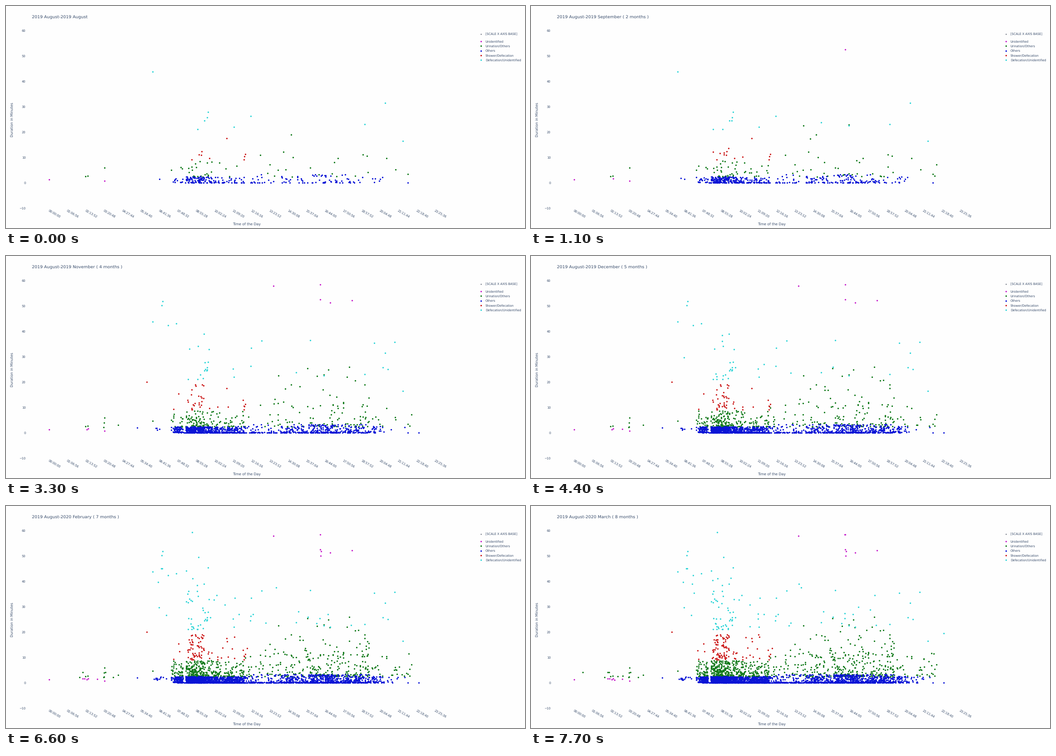
Animation of 1143x490 px, one loop 8 s. Source, as a matplotlib script:

```python
import numpy as np
import matplotlib.pyplot as plt
from matplotlib.animation import FuncAnimation

W, H, DPI = 1143, 490, 64
INK = "#384c6b"
FRAME_MS, LOOP_MS, HOLD_MS = 100, 8000, 1100
MONTHS = ["2019 August", "2019 September", "2019 October", "2019 November",
          "2019 December", "2020 January", "2020 February", "2020 March"]
AUG, SEP, OCT, NOV, DEC, JAN, FEB, MAR = range(8)
COLORS = {
    "Unidentified": "#c822cc",
    "Urination/Others": "#117a1a",
    "Others": "#0a14d6",
    "Shower/Defecation": "#cc1a1a",
    "Defecation/Unidentified": "#30d5d8",
}
PINK, GREEN, BLUE, RED, CYAN = COLORS
ZERO_Y, PER_MINUTE = 390.1, 5.6

# Share of all visits that each month adds
STEADY = [0.09, 0.08, 0.08, 0.16, 0.13, 0.13, 0.17, 0.16]
RISING = [0.06, 0.05, 0.05, 0.14, 0.13, 0.13, 0.22, 0.22]

plt.rcParams["text.hinting"] = "none"
rng = np.random.default_rng(8)
visits = {name: [np.empty((0, 2))] * len(MONTHS) for name in COLORS}


def add(name, month, x, minutes):
    y = ZERO_Y - PER_MINUTE * np.asarray(minutes)
    visits[name][month] = np.vstack([visits[name][month], np.column_stack([x, y])])


def band(name, total, low, high, skew, spans, share=RISING):
    """Random visits over (start, end, weight) spans; skew pulls them towards low."""
    start, end, weight = np.array(spans, float).T
    done = np.round(total * np.cumsum(share)).astype(int)
    for month, count in enumerate(np.diff(done, prepend=0)):
        pick = rng.choice(len(weight), count, p=weight / weight.sum())
        x = rng.uniform(start[pick], end[pick])
        add(name, month, x, low + (high - low) * rng.random(count) ** skew)


MORNING = [(363, 370, 2), (370, 390, 11), (396, 436, 45), (436, 465, 18), (465, 525, 24)]
AFTERNOON = [(525, 605, 15), (605, 668, 20), (668, 720, 32), (720, 800, 33)]

band(BLUE, 1150, 0.1, 2.45, 1.0, MORNING, STEADY)
band(BLUE, 600, 0.1, 3.3, 1.5, AFTERNOON, STEADY)
band(BLUE, 800, 0, 0.2, 2.5, [(375, 396, 3), (396, 525, 54), (525, 800, 43)], STEADY)
band(BLUE, 65, 0, 2.6, 1.6, [(800, 830, 4), (830, 882, 1)], STEADY)
band(BLUE, 14, 0.9, 2.5, 1.0, [(325, 353, 1)])

band(GREEN, 440, 2.4, 8.9, 1.9, MORNING)
band(GREEN, 270, 2.4, 11.5, 1.8, AFTERNOON)
band(GREEN, 55, 11, 23, 1.7, [(570, 650, 1), (650, 800, 4)])
band(GREEN, 34, 2.5, 12, 1.1, [(800, 894, 1)])
band(GREEN, 12, 2.1, 4.7, 1.3, [(160, 250, 2), (250, 332, 1)])

band(RED, 75, 9, 19, 1.2, [(397, 436, 1)])
band(RED, 26, 9, 20, 1.6, [(365, 382, 5), (438, 490, 14), (490, 552, 7)])

band(CYAN, 46, 21, 46, 1.8, [(396, 426, 3), (426, 450, 1)])
band(CYAN, 10, 23, 52, 0.8, [(318, 363, 1)])
band(CYAN, 36, 22, 40, 1.3, [(450, 570, 12), (570, 690, 8), (690, 760, 10), (780, 868, 4)])

band(PINK, 6, 0.9, 1.7, 1.0, [(155, 232, 1)])
band(PINK, 5, 45, 59, 1.0, [(690, 720, 1)])

# Isolated visits
for name, month, x, minutes in [
        (PINK, AUG, [95, 217], [1.3, 0.7]),
        (PINK, NOV, [589, 692, 762], [57.9, 58.4, 52.2]),
        (GREEN, AUG, [180, 217, 632, 838], [2.7, 5.9, 10, 9.6]),
        (GREEN, OCT, [323, 685, 790], [4.7, 22.4, 19]),
        (GREEN, NOV, [664, 710, 756], [25.3, 24.8, 26]),
        (GREEN, MAR, [114], [4.1]),
        (BLUE, AUG, [885], [0.1]),
        (BLUE, OCT, [909], [0]),
        (BLUE, NOV, [289], [2]),
        (RED, AUG, [524, 525, 527], [9.1, 10.3, 11.2]),
        (RED, OCT, [310], [20.1]),
        (CYAN, AUG, [437, 502, 539, 874], [24.4, 22, 26.2, 16.4]),
        (CYAN, OCT, [345, 375, 811], [51.8, 43, 35.4]),
        (CYAN, JAN, [410, 424], [59.3, 49.5]),
        (CYAN, MAR, [909], [19.4])]:
    add(name, month, x, minutes)

fig = plt.figure(figsize=(W / DPI, H / DPI), dpi=DPI, facecolor="#fefefe")
ax = fig.add_axes([0, 0, 1, 1])
ax.set(xlim=(0, W), ylim=(H, 0))
ax.axis("off")


def pt(px):
    return px * 72 / DPI


def label(x, y, text, size=6.6, ha="left"):
    """Text whose capitals are centred on y."""
    return ax.text(x, y + 0.365 * size, text, size=pt(size), color=INK, ha=ha,
                   va="baseline", family="DejaVu Sans")


def turned(x, y, text, size, angle):
    ax.text(x, y, text, size=pt(size), color=INK, rotation=angle, ha="center",
            va="center", rotation_mode="anchor", family="DejaVu Sans")


def dots(x, y, color, size=3.3):
    return ax.plot(x, y, "o", ms=pt(size), mew=0, color=color)[0]


for minutes in range(-10, 61, 10):
    label(43.3, ZERO_Y - PER_MINUTE * minutes, str(minutes).replace("-", "\u2212"),
          ha="right")
for i in range(22):
    s = 4016 * i
    turned(106.3 + 40.5 * i, 459, f"{s // 3600:02}:{s // 60 % 60:02}:{s % 60:02}",
           6.6, -30)
label(529.5, 480.6, "Time of the Day", 7.7, "center")
turned(14, 250.5, "Duration in Minutes", 7.7, 90)

dots([1045.5], [62.2], "#6f7480", 2.5)
label(1055.9, 61.9, "[SCALE X AXIS BASE]")
for i, (name, color) in enumerate(COLORS.items()):
    y = 78 + 10.35 * i
    dots([1045.5], [y], color)
    label(1055.9, y, name)

title = label(57.2, 23.7, "", 9.4)
layers = {name: dots([], [], color) for name, color in COLORS.items()}


def update(frame):
    last = frame * FRAME_MS // HOLD_MS
    count = f" ( {last + 1} months )" if last else ""
    title.set_text(f"{MONTHS[0]}-{MONTHS[last]}{count}")
    for name, layer in layers.items():
        layer.set_data(*np.vstack(visits[name][:last + 1]).T)
    return [title, *layers.values()]


anim = FuncAnimation(fig, update, frames=LOOP_MS // FRAME_MS, interval=FRAME_MS,
                     repeat=True, repeat_delay=0, blit=False)
plt.show()
```
